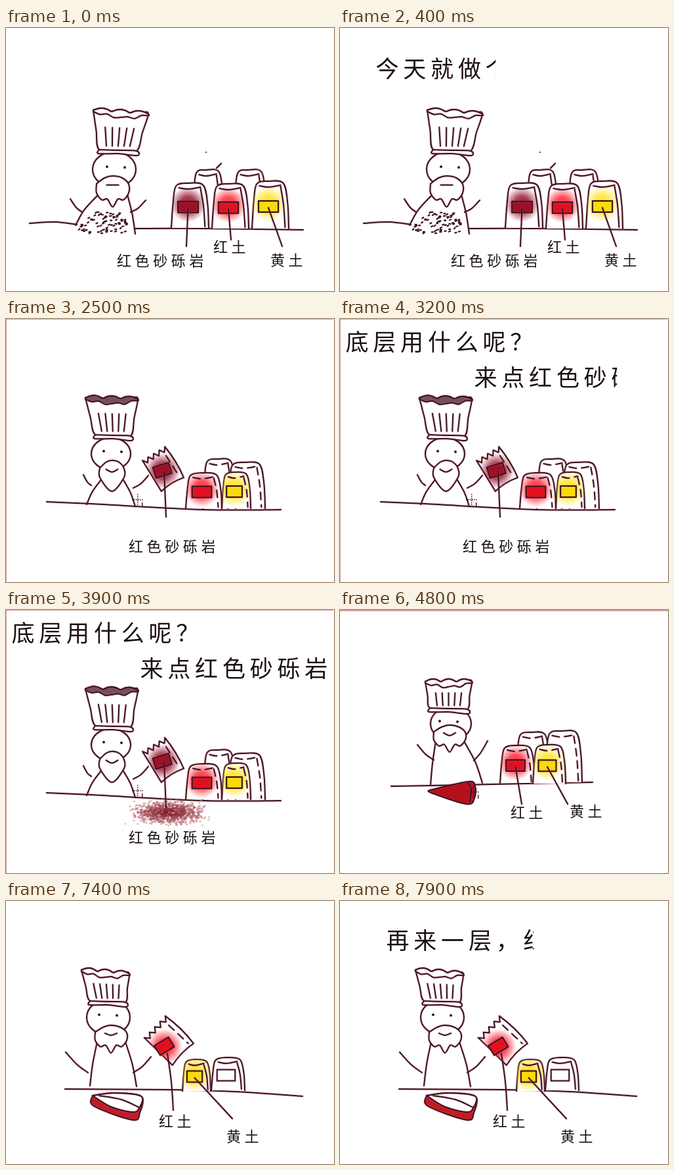
Recreate the animation shown at these times as an HTML page with a canvas. Size 500 by 400 pixels, loop 8 s.

```html
<!DOCTYPE html>
<html lang="zh">
<head>
<meta charset="utf-8">
<title>千层饼</title>
<style>
html, body { margin: 0; width: 100%; height: 100%; overflow: hidden; background: #fff; }
canvas { display: block; }
</style>
</head>
<body>
<canvas id="stage" width="500" height="400"></canvas>
<script>
const ctx = document.getElementById('stage').getContext('2d');
const LOOP = 8000, STEP = 100;
const INK = '#3a101c', FRINGE = 'rgba(190,90,125,0.25)';
const FONT = '"Noto Sans CJK SC", "Noto Sans CJK", sans-serif';
const RED = { tag: '#e2101e', glow: '255,35,50' };
const MAROON = { tag: '#a01024', glow: '150,20,45' };
const YELLOW = { tag: '#f8dc08', glow: '255,228,30' };

const clamp = (v, lo, hi) => Math.max(lo, Math.min(hi, v));
const mix = (a, b, k) => a + (b - a) * k;
const range = (n, fn) => Array.from({ length: n }, (_, i) => fn(i));
const stepsSince = (t, start, most) => clamp(Math.floor((t - start) / STEP), 0, most);

function seeded(seed) {
  return () => (seed = (seed * 16807) % 2147483647) / 2147483647;
}

// Smooth path through a few [x, y] points.
function smooth(pts) {
  const path = new Path2D();
  path.moveTo(...pts[0]);
  for (let i = 0; i < pts.length - 1; i++) {
    const b = pts[i], c = pts[i + 1];
    const a = pts[i - 1] || b, d = pts[i + 2] || c;
    path.bezierCurveTo(
      b[0] + (c[0] - a[0]) / 6, b[1] + (c[1] - a[1]) / 6,
      c[0] - (d[0] - b[0]) / 6, c[1] - (d[1] - b[1]) / 6, ...c);
  }
  return path;
}

function pen(path, width = 2) {
  ctx.strokeStyle = FRINGE;
  ctx.lineWidth = width + 2;
  ctx.stroke(path);
  ctx.strokeStyle = INK;
  ctx.lineWidth = width;
  ctx.stroke(path);
}

const line = (...pts) => pen(smooth(pts));

function blob(path, fill = '#fff') {
  ctx.fillStyle = fill;
  ctx.fill(path);
  pen(path);
}

// Stroke between two points whose middle is pushed down by sag.
function sagging([x1, y1], [x2, y2], sag) {
  line([x1, y1], [(x1 + x2) / 2, (y1 + y2) / 2 + sag], [x2, y2]);
}

function dot(x, y, r = 2) {
  ctx.fillStyle = INK;
  ctx.beginPath();
  ctx.arc(x, y, r, 0, 7);
  ctx.fill();
}

function hat([l, lTop, r, rTop], [bl, bandY, br], dark) {
  const rim = (n, lift) => range(n, i => {
    const k = i / (n - 1);
    return [mix(l, r, k), mix(lTop, rTop, k) + lift(k)];
  });
  const back = rim(13, k => -2 - 4 * Math.abs(Math.sin(k * 9.4)));
  const front = rim(9, k => 6 * Math.sin(k * Math.PI) + 2 * Math.sin(k * 19));
  const side = (k, t) => [mix(mix(l, r, k), mix(bl, br, k), t), mix(mix(lTop, rTop, k), bandY, t)];
  blob(smooth([...back, side(1, 0.5), [br, bandY + 2], [(bl + br) / 2, bandY + 1],
    [bl, bandY], side(0, 0.5), back[0]]));
  const opening = smooth([...back, ...front.reverse()]);
  blob(opening, dark ? '#75505c' : '#fff');
  for (let k = 0.2; k < 0.85; k += 0.15) line(side(k, 0.4), side(k, 0.9));
  blob(smooth([[bl, bandY], [(bl + br) / 2, bandY + 1], [br, bandY + 2], [br + 1, bandY + 9],
    [(bl + br) / 2, bandY + 6], [bl - 1, bandY + 6], [bl, bandY]]));
}

function beard([l, top, r, bottom], lobes, smile) {
  const w = r - l, h = bottom - top, side = top + 0.55 * h, mid = (l + r) / 2;
  const fringe = range(2 * lobes - 1, i => {
    const k = (i + 1) / (2 * lobes);
    return [mix(r, l, k), side + 0.45 * h * Math.sin(k * Math.PI) - (i % 2 ? 9 : 0)];
  });
  blob(smooth([[l, top + 0.25 * h], [l + 0.25 * w, top + 3], [mid, top], [r - 0.2 * w, top + 3],
    [r, top + 0.27 * h], [r, side], ...fringe, [l, side], [l, top + 0.25 * h]]));
  sagging([mid - 9, top + 0.29 * h], [mid + 9, top + 0.29 * h], smile);
}

function chef(c) {
  const [x, y, r] = c.head, [l, top, right, bottom] = c.beard, [bl, blY, br, brY] = c.base;
  const neck = mix(top, bottom, 0.6);
  line([l + 3, neck], [mix(l + 3, bl, 0.62), mix(neck, blY, 0.5)], [bl, blY]);
  line([right - 2, neck], [mix(right - 2, br, 0.62), mix(neck, brY, 0.5)], [br, brY]);
  c.arms.forEach(([shoulder, hand]) => sagging(shoulder, hand, 3));
  const face = new Path2D();
  face.ellipse(x, y, r, r * 0.82, 0, 0, 7);
  blob(face);
  dot(x + c.look - 13, y - 4);
  dot(x + c.look + 14, y - 3);
  beard(c.beard, c.lobes || 3, c.smile);
  hat(c.hat, c.band, c.darkHat);
}

function glow(path, x, y, rgb) {
  const r = 27, g = ctx.createRadialGradient(x, y, 0, x, y, r);
  g.addColorStop(0, `rgba(${rgb},1)`);
  g.addColorStop(0.45, `rgba(${rgb},0.8)`);
  g.addColorStop(1, `rgba(${rgb},0)`);
  ctx.save();
  ctx.clip(path);
  ctx.fillStyle = g;
  ctx.fillRect(x - r, y - r, 2 * r, 2 * r);
  ctx.restore();
}

function tag(x, y, w, h, fill) {
  const box = new Path2D();
  box.rect(x - w / 2, y - h / 2, w, h);
  blob(box, fill);
}

// Standing bag; an end point adds the pointer to its caption.
function bag([l, r, top, base], { tone, end, dashed, plain } = {}) {
  const w = r - l, h = base - top, x = (l + r) / 2 - 3, y = base - 0.48 * h;
  const tl = l + 0.13 * w, tr = r - 0.15 * w;
  const body = smooth([[l, base], [l + 0.05 * w, base - 0.6 * h], [tl, top + 2], [x, top - 2],
    [tr, top + 1], [r - 0.03 * w, base - 0.55 * h], [r, base]]);
  blob(body);
  if (tone) glow(body, x, y - 4, tone.glow);
  ctx.setLineDash(dashed ? [11, 8] : []);
  line([tl + 4, top + 5], [x, top + 7], [tr - 4, top + 4]);
  line([tr - 4, top + 6], [r - 0.14 * w, base - 0.5 * h], [r - 0.1 * w, base - 2]);
  ctx.setLineDash([]);
  if (tone || plain) tag(x, y, 0.54 * w, 17, tone ? tone.tag : '#fff');
  if (end) line([x, y + 2], end);
}

// Tilted bag with a ragged opening.
function tornBag(x, y, w, h, turn, tone, shift) {
  ctx.save();
  ctx.translate(x, y);
  ctx.rotate(turn);
  const body = new Path2D();
  for (let i = 0; i <= 8; i++) body.lineTo(w * (i / 8 - 0.5), -h / 2 + (i % 2 ? 5 : -2));
  body.quadraticCurveTo(w * 0.6, 0, w / 2, h / 2);
  body.quadraticCurveTo(0, h * 0.42, -w / 2, h / 2);
  body.closePath();
  blob(body);
  glow(body, shift, 1, tone.glow);
  ctx.setLineDash([11, 8]);
  line([w * 0.36, -h * 0.3], [w * 0.38, h * 0.4]);
  ctx.setLineDash([]);
  ctx.translate(shift, 0);
  ctx.rotate(0.25);
  tag(0, 0, 25, 17, tone.tag);
  ctx.restore();
}

function write(text, x, y, size, gap, shown = text.length) {
  ctx.font = `300 ${size}px ${FONT}`;
  ctx.textAlign = 'center';
  ctx.textBaseline = 'middle';
  ctx.fillStyle = '#1c1014';
  [...text].forEach((ch, i) => {
    const part = clamp(shown - i, 0, 1), cx = x + i * gap;
    ctx.save();
    ctx.beginPath();
    ctx.rect(cx - size / 2, y - size, size * part, size * 2);
    ctx.clip();
    ctx.fillText(ch, cx, y);
    ctx.restore();
  });
}

const caption = (text, x, y) => write(text, x, y, 22, 27.6);
const title = (text, x, y, shown) => write(text, x, y, 35, 41.8, shown);

function crosshair(x, y) {
  ctx.fillStyle = INK;
  for (let d = -8; d <= 8; d += 3) {
    ctx.fillRect(x + d, y, 1.5, 1.5);
    ctx.fillRect(x, y + d, 1.5, 1.5);
  }
  ctx.fillRect(x + 7, y + 5, 1.3, 6);
}

function edge(w, h) {
  ctx.fillStyle = '#d9a4a8';
  ctx.fillRect(0, 0, w, h);
}

function dirt() {
  const rnd = seeded(71);
  for (let i = 0; i < 75; i++) {
    const k = rnd();
    ctx.save();
    ctx.translate(mix(122, 107, k) + rnd() * mix(54, 86, k), 280 + 32 * k);
    ctx.rotate(rnd() - 0.8);
    ctx.fillStyle = INK;
    ctx.fillRect(-2, -1, 4, 2.2);
    ctx.restore();
  }
}

function powder(k) {
  const rnd = seeded(345), bell = () => (rnd() + rnd() + rnd()) / 1.5 - 1;
  for (let i = 0; i < 1100 * k; i++) {
    const dx = bell(), dy = bell(), far = Math.hypot(dx, dy);
    ctx.fillStyle = `rgba(${mix(125, 205, far)},${mix(25, 130, far)},${mix(40, 135, far)},0.5)`;
    ctx.fillRect(246 + dx * 72, 307 + dy * 23, 3, 2.4);
  }
}

function sceneA(t) {
  chef({
    hat: [133, 127, 217, 133], band: [142, 185, 199], head: [165, 215, 33], look: 2,
    beard: [138, 225, 187, 272], smile: 0, base: [106, 300, 197, 313],
    arms: [[[116, 280], [98, 260]], [[190, 280], [213, 262]]]
  });
  dirt();
  line([36, 297], [75, 295], [108, 299]);
  line([196, 305], [300, 305], [453, 307]);
  bag([284, 332, 218, 300]);
  bag([347, 397, 218, 300]);
  bag([252, 309, 238, 304], { tone: MAROON, end: [275, 332] });
  bag([314, 370, 239, 305], { tone: RED, end: [343, 322] });
  bag([375, 431, 235, 305], { tone: YELLOW, end: [421, 332] });
  line([321, 213], [328, 206]);
  dot(305, 189, 1);
  caption('红色砂砾岩', 180, 354);
  caption('红土', 327, 333);
  caption('黄土', 414, 353);
  title('今天就做个千层饼吧！', 72, 62, stepsSince(t, 0, 9) * 10 / 9);
}

function sceneB(t) {
  edge(1, 400);
  edge(498, 1);
  chef({
    hat: [121, 122, 201, 124], band: [136, 176, 190], head: [160, 205, 30], look: 2,
    beard: [143, 215, 180, 262], lobes: 1, smile: 4, base: [123, 282, 197, 285],
    arms: [[[130, 253], [118, 237]], [[194, 257], [217, 238]]], darkHat: true
  });
  line([62, 278], [130, 281], [300, 290], [419, 290]);
  bag([300, 350, 215, 288], { dashed: true });
  bag([338, 395, 220, 288], { dashed: true });
  bag([274, 329, 236, 288], { tone: RED, dashed: true });
  bag([329, 373, 235, 288], { tone: YELLOW, dashed: true });
  powder(stepsSince(t, 3400, 5) / 5);
  tornBag(240, 229, 40, 53, -0.55, MAROON, -2);
  line([241, 232], [244, 301]);
  crosshair(200, 274);
  caption('红色砂砾岩', 198, 346);
  const shown = stepsSince(t, 2500, 8) * 14 / 8;
  title('底层用什么呢？', 26, 35, shown);
  title('来点红色砂砾岩', 222, 89, shown - 7);
}

function sceneC(t) {
  edge(500, 2);
  chef({
    hat: [130, 111, 201, 111], band: [137, 149, 194], head: [169, 173, 31], look: -4,
    beard: [143, 175, 191, 216], smile: 4, base: [138, 266, 217, 263],
    arms: [[[143, 228], [118, 205]], [[204, 229], [225, 199]]]
  });
  line([78, 268], [140, 267], [385, 262]);
  blob(smooth([[137, 274], [195, 261], [206, 268], [205, 286], [193, 295], [139, 278], [137, 274]]), '#b5101c');
  line([195, 262], [200, 274], [198, 291]);
  crosshair(203, 276);
  bag([268, 320, 188, 260], { dashed: true });
  bag([312, 369, 186, 262], { dashed: true });
  bag([244, 297, 208, 263], { tone: RED, end: [277, 295], dashed: true });
  bag([294, 344, 207, 264], { tone: YELLOW, end: [347, 295], dashed: true });
  caption('红土', 271, 308);
  caption('黄土', 361, 306);
  title('下一层，淤泥？', 109, 54, stepsSince(t, 4800, 8) * 7 / 8);
}

function sceneD(t) {
  chef({
    hat: [115, 107, 188, 113], band: [128, 152, 182], head: [156, 177, 33], look: -1,
    beard: [136, 189, 184, 231], smile: 3, base: [128, 281, 199, 282],
    arms: [[[125, 261], [91, 230]], [[194, 261], [221, 237]]]
  });
  line([90, 286], [250, 287], [350, 290], [452, 297]);
  blob(smooth([[132, 296], [165, 292], [206, 297], [204, 322], [193, 333], [134, 312], [132, 296]]), '#c41a24');
  blob(smooth([[132, 296], [165, 292], [206, 297], [203, 315], [193, 321], [160, 313], [132, 296]]));
  line([142, 296], [176, 302], [203, 314]);
  bag([269, 312, 243, 289], { tone: YELLOW, end: [345, 331] });
  bag([313, 364, 240, 288], { plain: true });
  tornBag(249, 213, 46, 58, -0.8, RED, -11);
  line([246, 232], [252, 275], [255, 318]);
  caption('红土', 244, 335);
  caption('黄土', 347, 358);
  title('再来一层，红土', 88, 60, stepsSince(t, 7400, 5) * 1.09);
}

function draw(t) {
  ctx.fillStyle = '#fff';
  ctx.fillRect(0, 0, 500, 400);
  ctx.lineCap = ctx.lineJoin = 'round';
  const scene = t < 2500 ? sceneA : t < 4800 ? sceneB : t < 7400 ? sceneC : sceneD;
  scene(t);
}

const start = performance.now();
function tick() {
  draw(Math.max(0, performance.now() - start) % LOOP);
  requestAnimationFrame(tick);
}
tick();
</script>
</body>
</html>
```
